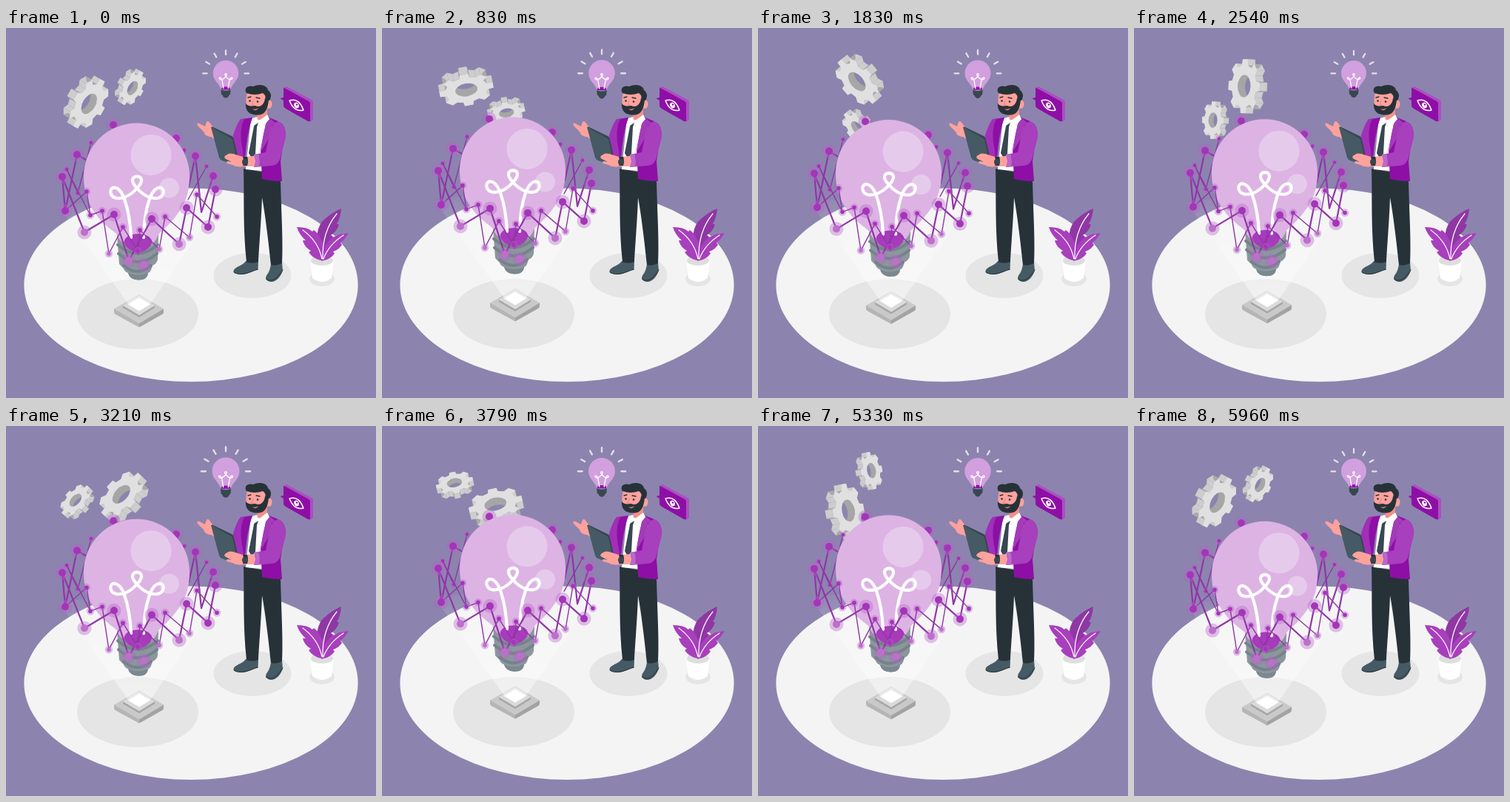
Animation of 500 by 500 pixels, one loop 6000 ms. Source, as an HTML page:

```html
<!DOCTYPE html>
<html lang="en">
<head>
<meta charset="utf-8">
<title>Idea</title>
<style>
html, body { margin: 0; width: 100%; height: 100%; overflow: hidden; background: #8c84ae; }
svg { display: block; width: 100vw; height: 100vh; }
.line { fill: none; stroke-linecap: round; stroke-linejoin: round; }
</style>
</head>
<body>
<svg viewBox="0 0 500 500">
  <defs>
    <linearGradient id="glow" x1="0" y1="1" x2="0" y2="0">
      <stop offset="0" stop-color="#fff" stop-opacity=".5"/>
      <stop offset="1" stop-color="#fff" stop-opacity=".04"/>
    </linearGradient>
  </defs>
  <ellipse cx="250" cy="347.300" rx="225.600" ry="130.700" fill="#f4f4f4"/>
  <g fill="#e5e5e5">
    <ellipse cx="178" cy="386.500" rx="82" ry="47.500"/>
    <ellipse cx="333" cy="334.500" rx="52.500" ry="30.500"/>
    <ellipse cx="427" cy="339" rx="17" ry="10"/>
  </g>

  <g id="gears"></g>

  <g id="float">
    <!-- chip -->
    <path d="M146 379L180 399V404.500L148 387Q146 386 146 384Z" fill="#b5b5b5"/>
    <path d="M213 379L180 399V404.500L211 387Q213 386 213 384Z" fill="#a3a3a3"/>
    <path d="M146 379.500L180 360L213 379.500L180 399Z" fill="#c9c9c9"/>
    <path d="M158 375L180 388L201 375V378L180 391L158 378Z" fill="#a6a6a6"/>
    <path d="M158 375L180 361.500L201 375L180 388Z" fill="#dadada"/>
    <path d="M165 373.500L180 364.500L195 373.500L180 382.500Z" fill="#fff"/>
    <path d="M166 374L72 242L105 236H252L286 242L194 374L180 382Z" fill="url(#glow)"/>
    <g id="ringBack"></g>
    <!-- bulb base -->
    <path d="M150 279H206L205 313Q204 318 198 321L196 327Q195 330 192 331Q191 340.500 179 340.500Q167 340 165 331Q160 329 159 325L153 319Z" fill="#8b979d"/>
    <path class="line" d="M151 293Q178 316 205 293M152 305Q178 327 204 305M159 321Q178 337 196 321" stroke="#75838a" stroke-width="4"/>
    <path d="M165 331Q178 337 192 331Q191 340.500 179 340.500Q167 340 165 331Z" fill="#7b888f"/>
    <!-- bulb -->
    <path d="M105 200A71.500 71.500 0 0 1 248 200C248 230 237 246 224 261C214 272 209 275 206 279Q202 289 197 292Q178 303 160 292Q154 289 150 279C145 274 139 271 129 261C116 246 105 230 105 200Z" fill="#ddb3e4"/>
    <path d="M159.500 290Q160 279 178 278Q197 279 197.500 290Q193 300 184 302L179 307L173 302Q163 299 159.500 290Z" fill="#a73bbb"/>
    <g fill="#e6caec"><circle cx="196" cy="171.500" r="27.500"/><circle cx="220.500" cy="216" r="13.500"/></g>
    <path class="line" d="M169 283C168 262 166 248 160 231C156 220 150 214 144 216C139 219 141 229 150 230C162 231 173 222 180 213C186 205 182 200.500 177 200.500C172 200.500 168 205 174 213C181 222 192 231 204 230C213 229 215 219 210 216C204 214 198 220 194 231C188 248 187 262 186 283" stroke="#fff" stroke-width="4.200"/>
    <g id="ringFront"></g>
  </g>

  <!-- small lamp -->
  <g id="lamp">
    <path id="rays" class="line" stroke="#e4e0ea" stroke-width="2.200"/>
    <path d="M280 61A17 17 0 0 1 314 61C314 71 306 74 303 83H291C288 74 280 71 280 61Z" fill="#d29fdf"/>
    <path d="M291 83Q291 79 297 79Q303 79 303 83Z" fill="#8e0fa6"/>
    <path class="line" d="M294 81L292 70C290 65 287 67 289 69C292 71 296 67 298 64C299 61 295 61 296 64C298 67 302 71 305 69C307 67 304 65 302 70L300 81" stroke="#fff" stroke-width="1.300"/>
    <path d="M290.500 83Q297 86 303.500 83L303 89L301 91Q300 94 297 94Q294 94 293 91L291 89Z" fill="#37474f"/>
  </g>

  <!-- speech badge -->
  <path d="M375 81L379 79L413 97Q415 98 415 100V124L411 127L379 104Z" fill="#ad4ec2"/>
  <path d="M375 82Q375 80 378 82L409 99Q411 100 411 102V125Q411 127 408 126L378 109Q375 107 375 105V98L370.500 95L375 94Z" fill="#8e0fa6"/>
  <path class="line" d="M383 98Q396 94 402 111Q389 114 383 98Z" stroke="#fff" stroke-width="1.400"/>
  <ellipse cx="392.500" cy="104.500" rx="3.200" ry="4" fill="#fff" transform="rotate(-20 392.500 104.500)"/>
  <circle cx="393" cy="103.500" r="1.200" fill="#8e0fa6"/>

  <!-- man -->
  <path d="M324 315H341L340.500 327C333 327 330 332 320 333C311 333 305 331 308.500 326C312 322 320 321 324 315ZM358 319L373 317L374 328C371 336 366 343 358 343C350 342 350 337 353 333C356 329 357 325 358 319Z" fill="#455a64"/>
  <path class="line" d="M308 330Q314 334 322 332Q331 330 340 326M351.500 339Q358 344 365 338Q370 333 374 327" stroke="#263238"/>
  <path d="M321 190L371 199C371 230 375 290 373 318Q365 322 358 320C355 290 350 250 346 229C345 260 342 295 341 316Q332 319 325 316C320 270 322 230 321 190Z" fill="#263238"/>
  <path d="M331 122L352 118L358 127L346 193L324 191Z" fill="#fff"/>
  <path d="M336 127L341 128L339 134L337 170L332 176L328 169L335 133Z" fill="#37474f"/>
  <path d="M333 121L317 123C311 130 306 147 304 157L309 181L322 188C324 165 325 140 333 121Z" fill="#a030b8"/>
  <path d="M333 121L322 123C317 132 316 148 320 165L322 188C324 165 326 140 333 121Z" fill="#8e0fa6"/>
  <path d="M353 120L368 126L374 160L371 180L373 207Q358 207 346 204L344 165Z" fill="#8e0fa6"/>
  <path d="M354 120L364 128L359 132L362 138L344 168Q347 142 354 120Z" fill="#a33bb9"/>
  <!-- near arm and tablet -->
  <path d="M283 151L277 147Q269 147 267 140L259 132Q257 128 261 129L269 133L271 127Q273 124 276 129L282 137L288 145Z" fill="#ffa29d"/>
  <path d="M277 134L303 147Q306 148 307 151L315 185Q315 188 312 187L292 179Q289 178 288 175Z" fill="#455a64"/>
  <path d="M277 134L279 133.500L305 146Q308 148 308 151L316 186L314 188L306 150Z" fill="#37474f"/>
  <path d="M296 173Q301 168 307 170L320 174L337 173V187L321 187Q313 189 306 185L299 183Q296 181 300 180L305 181L297 177Q294 175 296 173Z" fill="#ffa29d"/>
  <path d="M320 174L326 174Q328 180 326 186H320Q322 180 320 174Z" fill="#263238"/>
  <circle cx="323" cy="181" r="4" fill="#37474f"/>
  <path d="M367 126C378 128 380 143 377 152L370 178Q367 185 359 186L335 188Q339 180 335 171L351 168L356 143Q358 130 367 126Z" fill="#a83fbd"/>
  <path d="M335 171L341 170Q344 179 342 187.500L335 188Q339 180 335 171Z" fill="#bb68ca"/>
  <!-- head -->
  <path d="M338 110L353 106V119Q347 126 340 124Z" fill="#f28f8b"/>
  <path d="M338 120L341 126L353 117L356 123L347 134L341 128L335 132L334 123Z" fill="#fff"/>
  <path d="M326 88Q323 98 326 110Q331 118 342 116Q354 112 354 101L354 86Z" fill="#ffa29d"/>
  <ellipse cx="355" cy="103" rx="4.500" ry="6" fill="#ffa29d"/>
  <path d="M324 102C328 107 333 105 337 105C343 108 349 104 350 95L355 97C354 108 351 117 341 117.500C330 118 323 113 324 102Z" fill="#263238"/>
  <path d="M325 88C321 81 327 77 334 79C342 75 353 77 354 84C360 88 358 95 356 98L350 97Q352 91 347 88Q336 92 325 88Z" fill="#263238"/>
  <path class="line" d="M327 94L331 93M338 94L343 95" stroke="#263238" stroke-width="1.300"/>
  <path class="line" d="M334 98L332 104L335 104" stroke="#ed847e"/>
  <path d="M333 109Q337 111 341 108Q338 114 333 109Z" fill="#ed847e"/>
  <g fill="#263238"><circle cx="329.500" cy="98.500" r="1.300"/><circle cx="340" cy="99.500" r="1.300"/></g>

  <!-- plant -->
  <path d="M411 314Q427 307 443 314L440 338Q427 348 414 338Z" fill="#fff"/>
  <ellipse cx="427" cy="314.500" rx="15" ry="6.500" fill="#dedede"/>
  <path d="M424 312Q414 271 431 258Q441 249 453 244Q452 258 447 264L450 266Q446 276 439 280L442 282Q436 298 430 313Z" fill="#8f37a4"/>
  <path d="M426 315Q426 299 435 289L441 283L447 281L450 279L463 277Q457 287 452 290L454 293Q448 301 442 302L444 305Q437 313 430 314Z" fill="#a83fbd"/>
  <path d="M426 314Q415 312 409 303L412 301Q403 296 401 287L405 287Q396 279 393 269Q408 269 414 275L416 273Q425 280 426 288L428 287Q432 302 430 314Z" fill="#a83fbd"/>
  <path class="line" d="M427 312Q422 288 401 273M428 312Q427 275 447 251M429 312Q436 293 456 280" stroke="#fff" stroke-width="1.200"/>
</svg>
<script>
const $ = id => document.getElementById(id);
const LOOP = 6000, BEAT = 1500, LEAD = 30;

function gear(x, y, scale) {
  const front = [], depth = 10;
  for (let i = 0; i < 8; i++) {
    for (const [offset, radius] of [[-14, 29], [-9, 37], [9, 37], [14, 29]]) {
      const a = (i * 45 + offset) * Math.PI / 180;
      front.push([radius * Math.cos(a), .577 * radius * Math.sin(a)]);
    }
  }
  const sides = front.map((p, i) => [p, front[(i + 1) % front.length]])
    .sort((a, b) => a[0][1] + a[1][1] - b[0][1] - b[1][1])
    .map(([p, q]) => {
      const steep = Math.abs(q[1] - p[1]) > .6 * Math.abs(q[0] - p[0]);
      return `<path d="M${p}L${q}l0 ${-depth}L${p[0]} ${p[1] - depth}Z" fill="${steep ? '#a9a9a9' : '#cdcdcd'}"/>`;
    }).join('');
  return `<g transform="translate(${x} ${y}) rotate(-60) scale(${scale})">${sides}
    <path d="M-12.300 -5A15 8.700 0 1 0 12.300 -5A15 8.700 0 0 1 -12.300 -5Z" fill="#a6a6a6"/>
    <path d="M${front.join('L')}ZM-15 0A15 8.700 0 1 0 15 0A15 8.700 0 1 0 -15 0Z" fill="#e0e0e0" fill-rule="evenodd"/></g>`;
}
$('gears').innerHTML = gear(112.3, 102.5, 1) + gear(171, 81.2, .69);

const wire = (d, width) =>
  `<path class="line" d="${d}" stroke="#9135a8" stroke-width="${width}"/>`;
const nodes = (list, r, color = '#a435b8') => list.map(([x, y]) =>
  `<circle cx="${x}" cy="${y}" r="${r * 1.9}" fill="#b565c8" opacity=".38"/>
   <circle cx="${x}" cy="${y}" r="${r}" fill="${color}"/>`).join('');
const PALE = '#bd6fcb';

$('ringBack').innerHTML =
  wire('M80 247L96 171L145 200M230 149L247 214L256 173L264 249L280 200', 2.2) +
  wire('M82 191L97 223L115 155M241 165L236 215M271 187L246 232', 1.4) +
  nodes([[145, 131], [230, 149], [96, 171], [256, 173], [280, 200]], 5) +
  nodes([[115, 155], [82, 191], [97, 223], [241, 165], [271, 187]], 2.4);
$('ringFront').innerHTML =
  wire('M80 247L76 201L106 276L146 252L166 314L197 258L234 292L244 243L273 269L283 218', 2.2) +
  wire('M82 191L114 253L130 247L139 305L158 269L178 301L181 273L207 299L215 255L248 283L258 225L285 255M80 247L109 221L114 253', 1.4) +
  nodes([[80, 247], [76, 201], [146, 252], [197, 258], [244, 243], [273, 269], [283, 218]], 5) +
  nodes([[106, 276], [234, 292], [166, 314], [186, 320]], 5, PALE) +
  nodes([[109, 221], [114, 253], [130, 247], [158, 269], [178, 301], [181, 273],
    [215, 255], [258, 225], [285, 255]], 2.8) +
  nodes([[139, 305], [207, 299], [248, 283]], 2.8, PALE);

let rays = '';
for (let i = 0; i < 7; i++) {
  const a = Math.PI * (1 + i / 6), c = Math.cos(a), s = Math.sin(a);
  rays += `M${297 + 25 * c} ${61.3 + 25 * s}L${297 + 30.5 * c} ${61.3 + 30.5 * s}`;
}
$('rays').setAttribute('d', rays);

// Two beats, then a rest
function beat(p) {
  const keys = [[0, 1], [.14, 1.1], [.28, 1], [.42, 1.1], [.7, 1], [1, 1]];
  const i = keys.findIndex(k => k[0] > p);
  const [a, from] = keys[i - 1], [b, to] = keys[i];
  return from + (to - from) * (p - a) / (b - a);
}

function draw() {
  const t = performance.now() % LOOP, p = (t + LEAD) % BEAT / BEAT;
  const lift = 10 * (1 - Math.abs(1 - 2 * p));
  $('gears').setAttribute('transform', `rotate(${t / LOOP * 360} 133.5 95)`);
  $('float').setAttribute('transform', `translate(0 ${.4 - lift})`);
  $('lamp').setAttribute('transform', `translate(297 62) scale(${beat(p)}) translate(-297 -62)`);
  requestAnimationFrame(draw);
}
draw();
</script>
</body>
</html>
```
